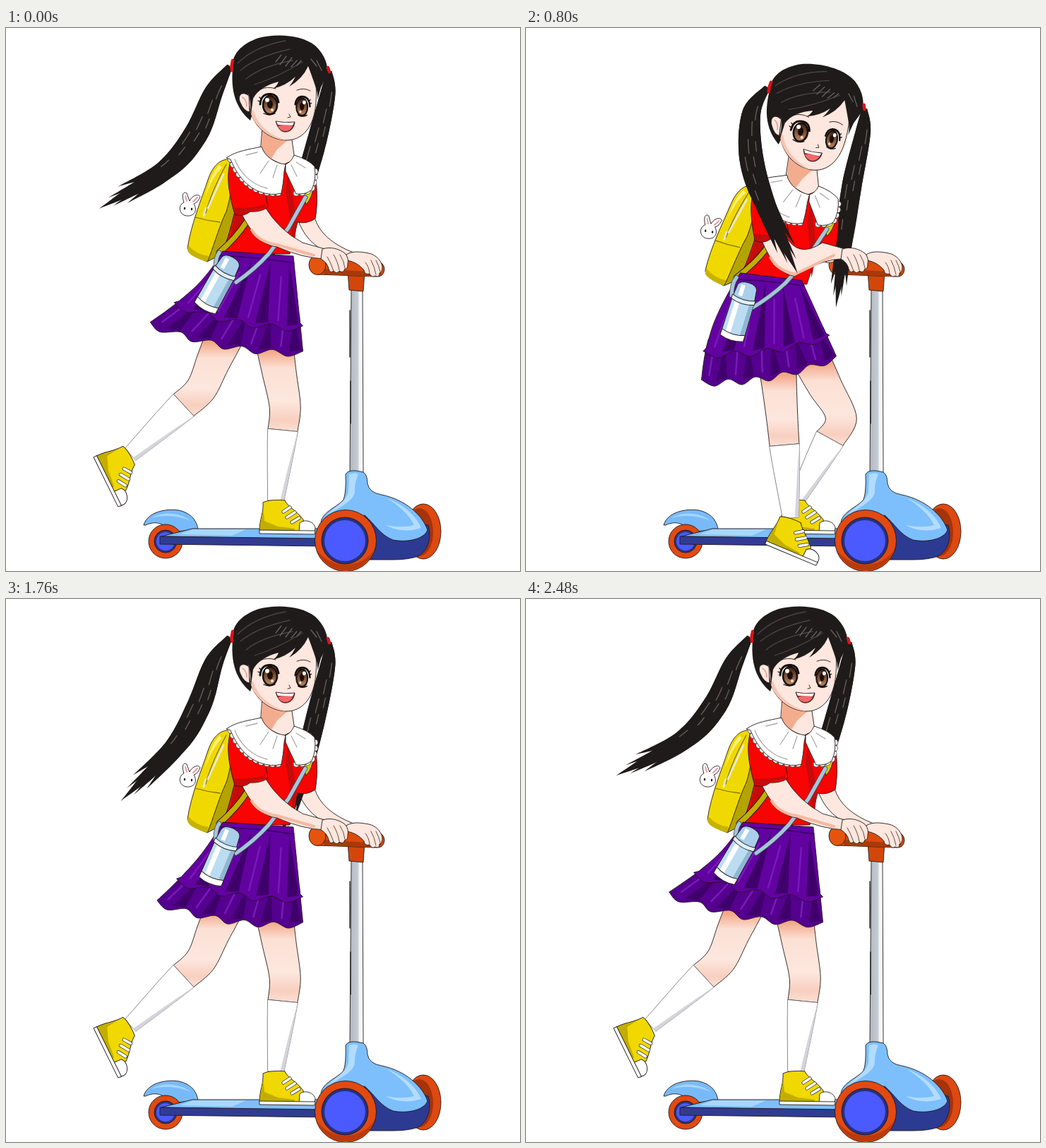
These frames come from a looping animation (728 by 769 pixels, 2.56 s). An HTML page:

```html
<!DOCTYPE html>
<html lang="en">
<head>
<meta charset="utf-8">
<title>Girl on a scooter</title>
<style>
html, body { margin: 0; width: 100%; height: 100%; overflow: hidden; background: #fff; }
svg { display: block; width: 100%; height: 100%; }
.o { stroke: #221a1a; stroke-width: .9; stroke-linejoin: round; }
.l { fill: none; stroke-linecap: round; stroke-linejoin: round; }
.hair { fill: #1f1b1a; }
.shine { fill: none; stroke: #68615e; stroke-width: 1.3; stroke-linecap: round; }
.skin { fill: #fde7de; }
.white { fill: #fff; }
.sock { fill: #fff; stroke: #666; stroke-width: .8; }
</style>
</head>
<body>
<svg viewBox="0 0 728 769">
<defs>
  <linearGradient id="thigh" x1="0" y1="0" x2="0" y2="1">
    <stop offset=".16" stop-color="#f3a788"/><stop offset=".34" stop-color="#fce0d4"/>
    <stop offset=".68" stop-color="#fde7de"/><stop offset=".88" stop-color="#f8cfbf"/><stop offset="1" stop-color="#fde0d5"/>
  </linearGradient>
  <linearGradient id="pole"><stop offset="0" stop-color="#b4b8c1"/><stop offset=".6" stop-color="#c6cad2"/><stop offset=".7" stop-color="#f2f3f6"/><stop offset="1" stop-color="#fff"/></linearGradient>
  <linearGradient id="iris" x1="0" y1="0" x2="0" y2="1"><stop offset="0" stop-color="#3a1c10"/><stop offset="1" stop-color="#c08a62"/></linearGradient>
  <g id="shoe">
    <path class="o" fill="#f0d800" d="M-15 4C-8 0 8 0 16 1C20 10 32 15 42 28L44 46L-20 44C-20 28 -14 18 -15 4Z"/>
    <path fill="#c2ad00" d="M-15 8L-13 30L6 38L30 41V45L-19 43C-19 28 -14 18 -15 8Z"/>
    <path class="o white" d="M37 33C45 26 58 32 59 40L58 47L36 46Z"/>
    <path class="o white" d="M-20 43L59 44L58 49L-20 48Z"/>
    <path class="l" stroke="#333" stroke-width="5" d="M14 17L23 11M19 25L30 18M26 32L36 26"/>
    <path class="l" stroke="#fff" stroke-width="3.6" d="M14 17L23 11M19 25L30 18M26 32L36 26"/>
  </g>
  <g id="eye">
    <ellipse class="white" rx="12" ry="14"/>
    <ellipse cx="1" cy="1" rx="10" ry="13" fill="url(#iris)" stroke="#1a100c" stroke-width="2.6"/>
    <ellipse cx="1" cy="0" rx="4" ry="6" fill="#1c0e08"/>
    <circle class="white" cx="-3" cy="-6" r="3"/><circle cx="4" cy="8" r="2" fill="#f5dfcf"/>
    <path class="l" stroke="#120d0c" stroke-width="3" d="M-13 0C-12 -12 -6 -15 2 -14.500C9 -14 12 -9 13 -3"/>
    <path class="l" stroke="#120d0c" stroke-width="1.3" d="M-12 -3L-16 -5M-11 -7L-14 -10M-8 13Q0 17 8 13"/>
  </g>
</defs>

<g id="scooter">
  <path class="o" fill="#78baf9" d="M195 704C200 686 225 680 245 683C262 687 270 697 272 710L232 714C224 700 210 698 198 704Z"/>
  <path fill="#a5d5fc" d="M206 694C222 684 246 686 262 698C244 690 222 689 206 694Z"/>
  <circle class="o" cx="226" cy="727" r="24" fill="#e24a12"/>
  <circle class="o" cx="226" cy="727" r="16" fill="#2b3480"/>
  <circle cx="226" cy="727" r="13" fill="#4a5aff"/>
  <path class="o" fill="#7dbefb" d="M232 717L264 709H450V724L220 720Z"/>
  <path fill="#a8d7fd" d="M264 710H340L320 719L246 717Z"/>
  <path class="o" fill="#303c92" d="M218 720L452 723V734L218 731Z"/>
  <ellipse class="o" cx="591" cy="713" rx="25" ry="39" fill="#dd4910"/>
  <ellipse cx="585" cy="714" rx="20" ry="34" fill="#a6330a"/>
  <path class="o" fill="#2c3a92" d="M508 690L598 704C603 722 598 740 584 748Q570 753 548 753H500Z"/>
  <path class="o" fill="url(#pole)" d="M489 370H505L506 630H487Z"/>
  <path class="l" stroke="#222" stroke-width="1.4" d="M487 400V466M488 500V560"/>
  <path class="o" fill="#7dbffc" d="M481 632Q484 626 496 627L506 629Q512 633 512 645Q514 658 532 661C566 668 590 690 597 711C592 724 568 729 548 725C530 718 522 702 508 690L446 700C448 685 470 678 478 668Q482 658 481 632Z"/>
  <path fill="#b2dcfd" d="M486 632Q494 629 499 632Q493 646 494 658C490 672 470 680 455 690C464 678 482 672 485 656ZM540 666C562 674 582 692 588 708C570 714 552 712 538 704C556 708 572 706 578 704C572 690 556 676 540 666Z"/>
  <circle class="o" cx="481" cy="726" r="43.500" fill="#e24a12"/>
  <path fill="#b93a0a" d="M440 738A43 43 0 0 0 522 738A46 40 0 0 1 440 738Z"/>
  <circle class="o" cx="480" cy="726" r="33" fill="#27307c"/>
  <circle cx="480" cy="726" r="29" fill="#4a5aff"/>
  <path class="o" fill="#d2460b" d="M484 344H508L506 373L486 371Z"/>
  <path class="o" fill="#d94b0d" d="M441 322L524 330Q536 332 536 342Q535 353 524 352L441 349Z"/>
  <path fill="#a93a08" d="M450 341L532 346Q530 352 522 352L450 349Z"/>
  <ellipse class="o" cx="441" cy="335.500" rx="12" ry="14" fill="#e4540f"/>
</g>

<path id="farArm" class="o skin"/>
<path class="o skin" d="M482 321C490 315 504 317 514 319C524 321 532 330 533 338Q533 346 529 347Q529 354 523 351Q518 354 515 348Q508 350 507 343C500 334 490 330 482 329Z"/>
<path class="l" stroke="#6b4a40" d="M509 332Q514 338 515 347M517 329Q522 338 524 349M524 329Q528 336 530 345"/>
<g id="tailR"></g>
<path id="skinF" class="o" fill="url(#thigh)"/><path id="sockF" class="sock"/><path id="shadeF" fill="#d4d4da"/>
<use href="#shoe" transform="translate(379 668)"/>
<path id="skinP" class="o" fill="url(#thigh)"/><path id="sockP" class="sock"/><path id="shadeP" fill="#d4d4da"/>
<use href="#shoe" id="shoeP"/>

<g id="back">
  <path class="o" fill="#b5a300" d="M315 186C330 195 332 260 318 290L302 322L285 331Z"/>
  <path class="o" fill="#f0d900" d="M315 186C302 186 292 197 286 215C277 242 262 278 257 312Q258 321 285 331C290 322 302 280 312 260C320 235 324 200 315 186Z"/>
  <path fill="#fff07a" d="M302 194C292 204 286 224 282 240C288 222 296 207 306 197Z"/>
  <path fill="#c7b200" d="M258 308Q270 321 287 323L285 331Q258 323 257 314Z"/>
  <path class="l" stroke="#7e7200" stroke-width="1.3" d="M268 268Q285 273 303 275M312 193C300 215 289 238 283 262"/>
  <path class="l" stroke="#e8e8e8" stroke-width="2.500" d="M308 207C301 222 293 240 286 255M283 255L280 266"/>
  <path class="o white" d="M252 247C248 235 252 231 256 234L260 245C265 235 274 235 275 239Q272 247 266 249C272 259 266 267 256 266C245 265 243 251 252 247Z"/>
  <path class="l" stroke="#ef9aa4" stroke-width="2" d="M254 238L256 245M271 240L265 246"/>
  <path class="l" stroke="#222" stroke-width="2.400" d="M253 255v1M263 256v1"/>
  <path class="o" fill="#f90303" d="M318 190L400 184L436 196C441 220 442 250 438 270Q426 278 413 275L402 320H308C313 298 320 280 326 250Z"/>
  <path fill="#c40c0c" d="M399 208L406 238L412 275L408 310C404 290 402 262 396 232ZM326 255L342 272C338 288 330 300 314 312Z"/>
  <path class="l" stroke="#2a1a1a" stroke-width="9" d="M341 274Q327 296 302 318"/>
  <path class="l" stroke="#c2ae00" stroke-width="7" d="M341 274Q327 296 302 318"/>
  <path class="o" fill="#dfc800" d="M424 228L435 226Q434 240 425 250Q421 240 424 228Z"/>
</g>
<g id="skirt"></g>
<g id="front">
  <path class="l" stroke="#40505c" stroke-width="6.600" d="M424 240L400 283L372 320Q352 342 326 360M302 318Q296 326 297 344"/>
  <path class="l" stroke="#a6c5da" stroke-width="5" d="M424 240L400 283L372 320Q352 342 326 360M302 318Q296 326 297 344"/>
</g>
<g id="bottle">
  <path class="o" fill="#bcdcf2" d="M-16 18Q0 12 16 18L17 72Q0 78 -17 72Z"/>
  <path class="white" d="M-11 20H-4V70H-11Z"/><path fill="#8fb6d2" d="M10 19H16V70H10Z"/>
  <path class="o white" d="M-17 66Q0 72 17 66V75Q0 81 -17 75Z"/>
  <path class="o" fill="#a9cfea" d="M-14 0Q-12 -7 0 -7Q12 -7 14 0L16 18Q0 23 -16 18Z"/>
  <path class="o" fill="#dff0fb" d="M-17 15Q0 21 17 15V21Q0 27 -17 21Z"/>
  <path class="white" d="M-9 -2H-3V14H-9Z"/>
</g>
<path id="neck" class="o skin"/><path id="neckShade" fill="#f4ac8f"/>
<path id="nearArm" class="o skin"/>
<path id="armShade" class="l" stroke="#f5b9a2" stroke-width="4"/>
<path class="o skin" d="M448 313C460 309 472 313 480 319Q486 326 484 334Q484 342 480 341Q478 348 472 344Q469 349 464 344Q459 348 457 341Q455 332 446 327Z"/>
<path class="l" stroke="#6b4a40" d="M455 324Q460 332 464 344M464 321Q470 331 472 343M473 321Q479 330 480 340"/>
<g id="dress">
  <path class="o" fill="#fa0303" d="M318 188C313 206 313 226 324 264Q336 268 346 260Q360 261 371 254C368 232 362 212 352 202Z"/>
  <path fill="#c40c0c" d="M322 254L324 263Q336 267 346 259L368 254L367 250Q340 257 322 254Z"/>
  <path class="l" stroke="#555" stroke-width="8.600" stroke-dasharray=".1 8" d="M318 186C326 206 340 224 360 231Q376 236 390 233M411 234Q426 234 433 228Q440 212 437 198"/>
  <path class="l" stroke="#fff" stroke-width="7" stroke-dasharray=".1 8" d="M318 186C326 206 340 224 360 231Q376 236 390 233M411 234Q426 234 433 228Q440 212 437 198"/>
  <path class="o white" d="M312 184C326 174 344 172 362 168C366 182 382 192 396 193L394 203Q393 220 390 234Q376 238 360 232C340 225 326 206 318 186Z"/>
  <path class="o white" d="M396 193Q404 190 408 180Q428 186 437 196Q440 214 433 229Q426 236 411 235Q402 216 396 203Z"/>
  <path class="l" stroke="#aaa" stroke-width="1.300" d="M324 186C332 206 348 222 370 227M340 180L356 176M372 188L360 206M384 194L378 212M404 194L412 210M411 190L424 198"/>
</g>
<g id="tailL"></g>

<g id="head">
  <path class="hair" d="M322 50C316 92 328 116 346 131L356 100Z"/>
  <path class="o skin" d="M342 70C342 98 344 114 349 126C357 144 374 158 397 159C419 159 434 142 438 114C441 92 440 70 432 48L372 48Z"/>
  <path fill="#f9c4b0" d="M346 118C350 138 374 158 397 159C374 152 356 138 350 116Z"/>
  <path class="o skin" d="M344 96C334 88 327 96 332 106Q337 118 345 119Z"/>
  <path class="l" stroke="#d88f78" stroke-width="1.200" d="M335 98Q341 102 341 111"/>
  <use href="#eye" transform="translate(373 108)"/>
  <use href="#eye" transform="translate(420 111) scale(-.8 .95)"/>
  <path class="l" stroke="#3a2a26" d="M360 87Q370 82 382 86M412 88Q422 84 431 89M401 122L403 126L399 127"/>
  <path class="o" fill="#8a1f1c" d="M382 132Q395 135 409 133C408 142 402 148 394 147Q386 146 382 132Z"/>
  <path fill="#f0686a" d="M385 139Q395 135 406 139Q402 147 394 146Q388 145 385 139Z"/>
  <path class="white" d="M383 132.500Q395 135 408 133.500L406 138Q395 137 385 137Z"/>
  <path class="hair" d="M321 62C317 38 334 22 358 14C384 7 420 10 438 25C452 38 457 54 455 66L446 84L441 102Q442 92 438 82Q434 70 428 54Q420 72 401 83Q406 77 410 69Q396 82 378 86Q384 82 386 76C370 80 356 88 350 100Q348 114 346 131C348 106 344 92 340 88Q328 84 321 62Z"/>
  <g class="shine">
    <path d="M328 50Q352 26 396 18M332 60Q356 40 402 30M340 72Q362 54 406 46M352 80Q384 70 420 48" stroke="#4a4340"/>
    <path d="M382 48L390 38M388 52L397 40M396 54L405 42M404 55L412 46M412 53L418 46M432 44L440 54M440 46L447 60"/>
  </g>
  <path class="l" stroke="#d8141a" stroke-width="4.500" d="M321 46Q319 53 320 60M456 56L458 62"/>
</g>
</svg>
<script>
const LOOP = 2560, STEP = 80;
const $ = id => document.getElementById(id);
const set = (id, d) => $(id).setAttribute('d', d);
const move = (id, v) => $(id).setAttribute('transform', v);
const rad = deg => deg * Math.PI / 180;
const add = (a, b, k = 1) => [a[0] + b[0] * k, a[1] + b[1] * k];
const mix = (a, b, k) => Array.isArray(a) ? a.map((v, i) => mix(v, b[i], k)) : a + (b - a) * k;
const unit = a => { const n = Math.hypot(...a) || 1; return [a[0] / n, a[1] / n]; };
const dir = (a, b) => unit(add(b, a, -1));
const perp = a => [-a[1], a[0]];
const str = p => p[0].toFixed(1) + ' ' + p[1].toFixed(1);
const poly = pts => 'M' + pts.map(str).join('L') + 'Z';
const range = (n, f) => Array.from({ length: n + 1 }, (_, i) => f(i / n, i));

// Four poses of one kick; wind is how much the breeze shows.
const glide = { shift: [0, 0], lean: 0, head: [0, 0], nod: 0, hemL: [208, 428], hemR: [421, 462],
  hipF: [379, 440], hipP: [310, 436], foot: [176, 604], tilt: 63, bottle: 24, hair: [48, 20], wind: 1 };
const reach = { shift: [4, 30], lean: 3, head: [15.5, 31], nod: 8, hemL: [249, 493], hemR: [440, 462],
  hipF: [405, 450], hipP: [368, 450], foot: [354, 635], tilt: 36, bottle: 21, hair: [-20, -33], wind: 0 };
const plant = { shift: [5, 43], lean: 4.4, head: [14.5, 42.5], nod: 9.5, hemL: [248, 503], hemR: [441, 468],
  hipF: [402, 465], hipP: [356, 475], foot: [375, 694], tilt: 22, bottle: 17, hair: [-25, 7], wind: 0 };
const kick = { shift: [8, 7], lean: 3, head: [20, 11], nod: 6, hemL: [222, 449], hemR: [429, 460],
  hipF: [388, 450], hipP: [311, 443], foot: [199, 625], tilt: 54, bottle: 21, hair: [17, 20], wind: 0 };
const cues = [[0, glide], [480, reach], [800, plant], [1120, kick], [1280, glide], [LOOP, glide]];

function poseAt(t) {
  const i = cues.findIndex(c => c[0] > t), [t0, a] = cues[i - 1], [t1, b] = cues[i];
  const s = (t - t0) / (t1 - t0), k = s * s * (3 - 2 * s), p = {};
  for (const name in a) p[name] = mix(a[name], b[name], k);
  const gust = p.wind * Math.cos((t - 2480) / 420 * 2 * Math.PI);
  p.hemL = add(p.hemL, [-10, -10], gust);
  p.hair = add(p.hair, [14, 6], gust);
  p.bottle += 6 * gust;
  return p;
}

// Smooth curve through points.
function curve(p, start = 'M') {
  let d = start + str(p[0]);
  for (let i = 0; i < p.length - 1; i++) {
    const a = p[i - 1] || p[i], b = p[i], c = p[i + 1], e = p[i + 2] || c;
    d += 'C' + [add(b, add(c, a, -1), 1 / 6), add(c, add(e, b, -1), -1 / 6), c].map(str).join(' ');
  }
  return d;
}
const band = (l, r) => curve(l) + curve([...r].reverse(), 'L') + 'Z';

function turn(p, pivot, deg, shift) {
  const [x, y] = add(p, pivot, -1), c = Math.cos(rad(deg)), s = Math.sin(rad(deg));
  return add(add(pivot, shift), [x * c - y * s, x * s + y * c]);
}

// The knee bends forward to keep the thigh and shin lengths.
function leg(name, hip, ankle, thigh, shin) {
  const d = dir(hip, ankle), dist = Math.min(Math.hypot(...add(ankle, hip, -1)), thigh + shin);
  const along = (thigh ** 2 - shin ** 2 + dist ** 2) / (2 * dist);
  const knee = add(add(hip, d, along), perp(d), -Math.sqrt(Math.max(0, thigh ** 2 - along ** 2)));
  const d2 = dir(knee, ankle), n1 = perp(dir(hip, knee)), n2 = perp(d2), nk = unit(add(n1, n2));
  const top = add(knee, d2, 33), calf = mix(knee, ankle, .5);
  const skin = s => [add(hip, n1, 27 * s), add(mix(hip, knee, .5), n1, 24 * s), add(knee, nk, 22 * s), add(top, n2, 21 * s)];
  const sock = s => [add(top, n2, 21.5 * s), add(calf, n2, 18.5 * s), add(ankle, n2, 11.5 * s)];
  const edge = sock(-1);
  set('skin' + name, band(skin(1), skin(-1)));
  set('sock' + name, band(sock(1), edge));
  set('shade' + name, band(edge, [edge[0], add(calf, n2, -15.5), add(ankle, n2, -6)]));
}

// A chain of four links, each given by its angle from straight down, split into locks.
function tail(id, root, angles, links, width) {
  const p = [root];
  angles.forEach((a, i) => p.push(add(p[i], [-Math.sin(rad(a)), Math.cos(rad(a))], links[i])));
  const half = p.map((_, i) => i < 4 ? width * (.25 + .75 * Math.sin(i * .75)) : 0);
  const side = p.map((q, i) => perp(dir(p[i - 1] || q, p[i + 1] || q)));
  const strand = k => p.map((q, i) => i < 4 ? add(q, side[i], k * half[i] * .5)
    : add(mix(p[3], q, 1 - .35 * Math.abs(k)), side[i], k * width * .8));
  const lock = (k, w) => {
    const c = strand(k), rim = s => c.map((q, i) => add(q, side[i], s * w * half[i]));
    return `<path class="hair" d="${band(rim(1), rim(-1))}"/>`;
  };
  const line = k => `<path class="shine" stroke-dasharray="0 ${70 + 40 * k} 20 30 14 400" d="${curve(strand(k))}"/>`;
  $(id).innerHTML = lock(0, 1) + [-1, -.5, .5, 1].map(k => lock(k, .5)).join('') + [-1, -.4, .3, 1].map(line).join('');
}

// Two pleated tiers spread between the waist and the hem.
function skirt(wl, wr, hl, hr) {
  const bow = (wl[0] - hl[0] - 80) / 2;
  const at = (u, v) => add(mix(mix(wl, wr, u), mix(hl, hr, u), v),
    [bow * (1 - u) * Math.sin(v * Math.PI), 10 * v * Math.sin(u * Math.PI)]);
  const path = (d, attr) => `<path ${attr} d="${d}"/>`;
  const tier = (v0, v1, pleats, over, fill) => {
    const hem = range(pleats * 2, (u, i) => at(u * (1 + 2 * over) - over, v1 + (i % 2 ? .03 : -.03)));
    const side = u => range(3, k => at(u, mix(v0, v1 - .06, k)));
    let out = path(curve(side(0)) + curve(hem, 'L') + curve(side(1).reverse(), 'L') + 'Z', `class="o" fill="${fill}"`);
    for (let i = 0; i < pleats; i++) {
      const u = (i + .75) / pleats, w = .2 / pleats, top = mix(v0, v1, .1);
      out += path(poly([at(u, top), at(u - w, v1 - .02), at(u + w, v1 - .04)]), 'fill="#40006c"');
      out += path(curve([at(u - 2.2 * w, mix(v0, v1, .3)), at(u - 2.4 * w, v1 - .07)]), 'class="l" stroke="#7a18bd" stroke-width="2.5"');
    }
    return out;
  };
  $('skirt').innerHTML = tier(.6, 1, 5, 0, '#55008e') + tier(0, .74, 4, .02, '#6202a0')
    + path(curve([at(0, .06), at(.5, .05), at(1, .07)]), 'class="l" stroke="#38005e" stroke-width="1.5"');
}

function draw(t) {
  const p = poseAt(t), neck = [397, 200], face = [397.5, 109.5];
  const T = (x, y) => turn([x, y], neck, p.lean, p.shift);
  const H = (x, y) => turn([x, y], face, p.nod, p.head);
  for (const id of ['back', 'front', 'dress']) move(id, `translate(${p.shift}) rotate(${p.lean} ${neck})`);
  move('head', `translate(${p.head}) rotate(${p.nod} ${face})`);
  move('bottle', `translate(${T(318, 331)}) rotate(${p.bottle})`);

  leg('F', p.hipF, [382, 670], 98, 134);
  leg('P', p.hipP, p.foot, 83, 136);
  move('shoeP', `translate(${p.foot}) rotate(${p.tilt})`);
  const crouch = p.shift[1] / 43;
  skirt(add(T(307, 316), [0, -5], crouch), add(T(407, 323), [-12, -9], crouch), p.hemL, p.hemR);

  set('neck', poly([H(363, 140), H(404, 152), T(409, 186), T(392, 194), T(360, 178)]));
  set('neckShade', poly([H(364, 140), H(402, 156), T(384, 172), T(374, 188), T(361, 178)]));
  set('nearArm', `M${str(T(366, 252))}Q${str(T(386, 286))} 420 304L452 313V327Q420 326 ${str(T(384, 310))}Q${str(T(356, 308))} ${str(T(333, 262))}Z`);
  set('armShade', `M${str(T(348, 286))}Q${str(T(358, 303))} ${str(T(384, 307))}L436 322`);
  set('farArm', `M${str(T(413, 270))}Q${str(T(424, 304))} 456 318L492 328V318Q${str(T(446, 300))} ${str(T(437, 268))}Z`);

  const [l, r] = p.hair;
  tail('tailL', H(317, 54), [32, 7 + .27 * l, .68 * l, l], [42, 65, 68, 108], 17);
  tail('tailR', H(458, 61), [4, 11 + .1 * r, 4 + .55 * r, r], [33, 80, 80, 92], 14);
}

const start = performance.now();
let shown = -1;
function tick() {
  const t = Math.floor((performance.now() - start) % LOOP / STEP) * STEP;
  if (t !== shown) draw(shown = t);
  requestAnimationFrame(tick);
}
tick();
</script>
</body>
</html>
```
